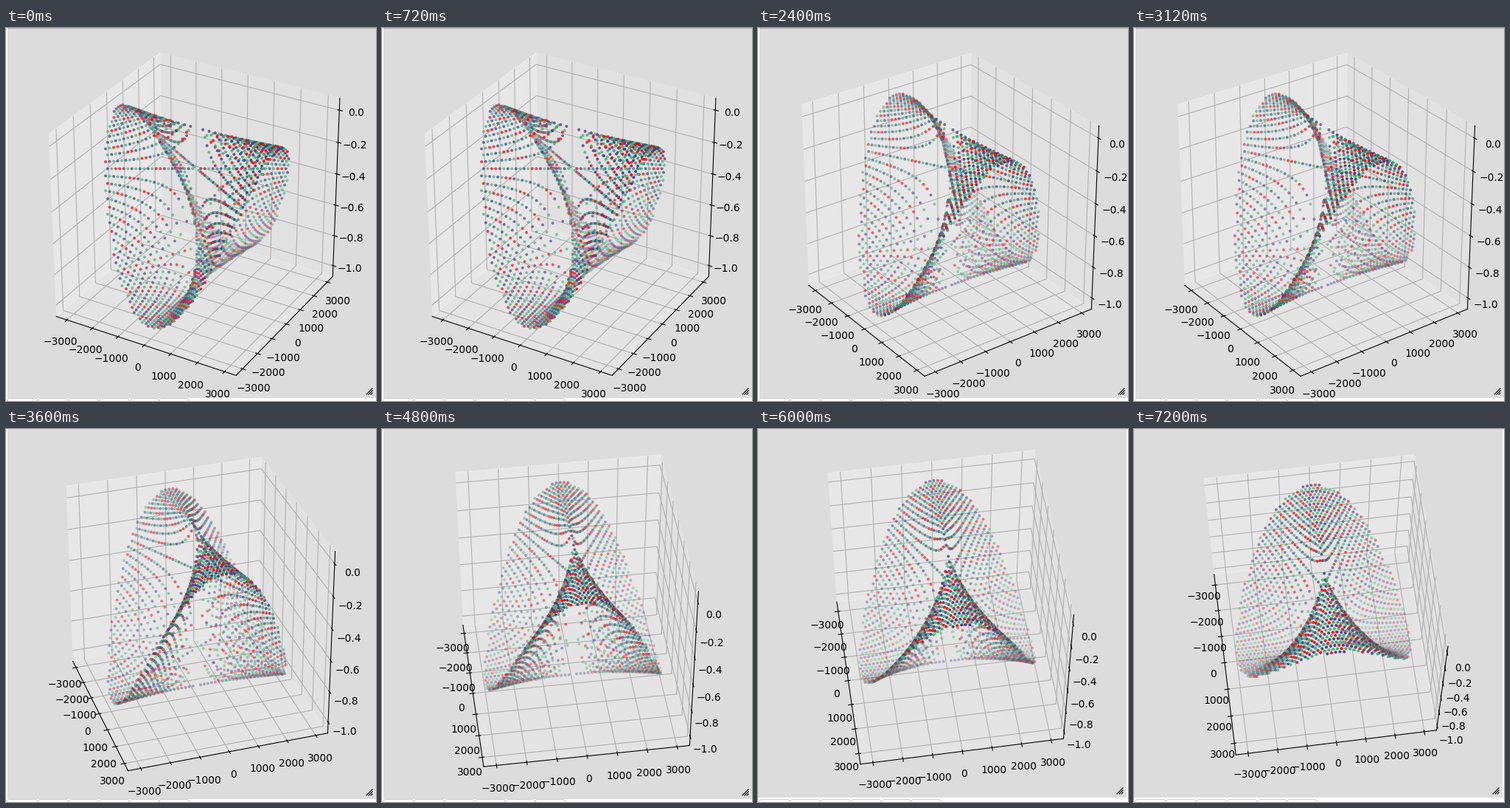
A matplotlib script that plays this animation: 502 px wide and 505 px high, repeating every 8000 ms.

```python
import math

import numpy as np
import matplotlib.pyplot as plt
from matplotlib.animation import FuncAnimation
from matplotlib.patches import FancyBboxPatch, Rectangle

W, H, DPI = 502, 505, 100
CANVAS = 500
STEP_MS, LOOP_MS = 400, 8000
HOLD = 3  # animation steps per pose

# elevation, azimuth, canvas left, canvas top, line along the top edge
POSES = [
    (30, -60, 2, 1, True),
    (29.5, -46.4, 2, 1, False),
    (29, -35.9, 2, 1, True),
    (31, -18, 2, 1, False),
    (42.5, -8, 2, 1, False),
    (52.6, -8.5, 0, -1, False),
    (64.4, -7.5, 0, -1, False),
]


def conoid_points(radius=2990, gap=132):
    """Hexagonal lattice on a disc, lifted onto Pluecker's conoid."""
    row_gap = gap * math.sqrt(3) / 2
    n = int(radius / row_gap) + 1
    points, colors = [], []
    for i in range(-n, n + 1):
        for j in range(-n, n + 1):
            x, y = i * row_gap, (j + 0.5 * (i % 2)) * gap
            r2 = x * x + y * y
            if not 0 < r2 <= radius * radius:
                continue
            points.append((x, y, -y * y / r2))
            if (j + 2 * (i // 2)) % 5 == 0:
                colors.append("red")
            else:
                colors.append("mediumseagreen" if i % 2 else "darkslateblue")
    return np.array(points).T, colors


plt.rcParams.update({"font.family": "DejaVu Sans", "font.size": 10,
                     "grid.color": "#b0b0b0"})
# The small surplus keeps the pixel size from being rounded down
fig = plt.figure(figsize=((W + 0.01) / DPI, (H + 0.01) / DPI), dpi=DPI,
                 facecolor="white")

# Window around the plot, in pixels from the top left
page = fig.add_axes([0, 0, 1, 1], zorder=0)
page.set(xlim=(0, W), ylim=(H, 0))
page.axis("off")
for left, right in [(2, 43), (44, 84), (85, 125), (127, 167), (169, 207), (208, 248)]:
    page.add_patch(FancyBboxPatch(
        (left + 3, 504.5), right - left - 6, 20, boxstyle="round,pad=3",
        fc="white", ec="#cccccc", lw=0.72))
canvas = page.add_patch(Rectangle((0, 0), CANVAS, CANVAS, fc="gainsboro", lw=0))
top_line = page.add_patch(Rectangle((2, 0), CANVAS, 1, fc="#ababab", lw=0))
grip = [page.plot([], [], color="#222222", lw=0.9)[0] for _ in range(3)]

ax = fig.add_axes([0, 0, 1, 1], projection="3d", zorder=1)
ax.patch.set_visible(False)
ax.set_box_aspect((1, 1, 1), zoom=0.94676)
(xs, ys, zs), dot_colors = conoid_points()
ax.scatter(xs, ys, zs, c=dot_colors, s=8, linewidths=0, depthshade=True)
ax.set(xlim=(-3420, 3420), ylim=(-3420, 3420), zlim=(-1.073, 0.073))
ax.set_xticks(range(-3000, 3001, 1000))
ax.set_yticks(range(-3000, 3001, 1000))
ax.set_zticks(np.linspace(-1, 0, 6))
ax.zaxis.set_major_formatter("{x:.1f}")


def draw(step):
    elev, azim, left, top, has_line = POSES[step // HOLD]
    ax.view_init(elev=elev, azim=azim)
    bottom = H - top - CANVAS
    ax.set_position([left / W, bottom / H, CANVAS / W, CANVAS / H])
    canvas.set_xy((left, top if top < 0 else 0))
    canvas.set_height(CANVAS if top < 0 else CANVAS + top)
    top_line.set_visible(has_line)
    x1, y1 = left + 495, top + 495
    for k, line in enumerate(grip):
        size = 8 - 3 * k
        line.set_data([x1 - size, x1], [y1, y1 - size])
    return []


anim = FuncAnimation(fig, draw, frames=LOOP_MS // STEP_MS, interval=STEP_MS,
                     init_func=lambda: draw(0), repeat=True, repeat_delay=0)
plt.show()
```
